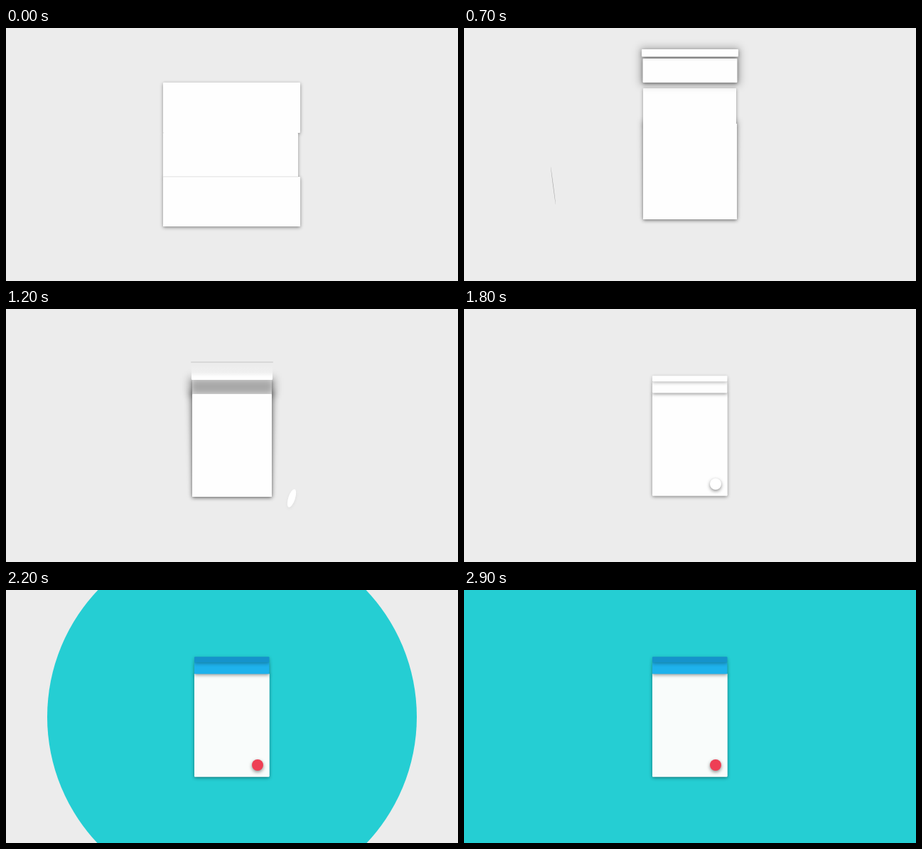
Write an HTML page with a canvas that moves like this. It is 636x357 px and loops after 3000 ms.

```html
<!DOCTYPE html>
<html lang="en">
<head>
<meta charset="utf-8">
<title>Paper folding</title>
<style>
  html, body { margin: 0; width: 100%; height: 100%; overflow: hidden; background: #ececec; }
  canvas { display: block; width: 636px; height: 357px; }
</style>
</head>
<body>
<canvas id="stage" width="636" height="357"></canvas>
<script>
const ctx = document.getElementById('stage').getContext('2d');
const LOOP = 3000, STEP = 100;
const PAPER = '#fefefe';

// Monotone cubic curve through (times, values)
function curve(times, values) {
  const slope = i => (values[i + 1] - values[i]) / (times[i + 1] - times[i]);
  const last = times.length - 1;
  const tangent = i => {
    if (i === 0) return slope(0);
    if (i === last) return 0;
    const a = slope(i - 1), b = slope(i);
    return a * b <= 0 ? 0 : 2 * a * b / (a + b);
  };
  return t => {
    if (t <= times[0]) return values[0];
    if (t >= times[last]) return values[last];
    let i = 0;
    while (t > times[i + 1]) i++;
    const d = times[i + 1] - times[i], u = (t - times[i]) / d, v = 1 - u;
    return values[i] * (1 + 2 * u) * v * v + tangent(i) * d * u * v * v
      + values[i + 1] * (3 - 2 * u) * u * u - tangent(i + 1) * d * u * u * v;
  };
}

const sheet = (...v) => curve([0, 400, 700, 1200, 1800], v);
const orbit = (...v) => curve([100, 400, 700, 950, 1200, 1800], v);

const tracks = {
  left: sheet(221, 233, 252, 262, 265),
  right: sheet(414, 403, 384, 374, 370.5),
  frontTop: sheet(210, 165, 135, 120, 118.5),
  bottom: sheet(280, 277, 270, 265, 263.5),
  backTop: sheet(148, 122, 85, 100, 118),
  backInset: sheet(3, 0, 1, 0, 0),
  barTop: sheet(77, 72.5, 43, 79, 102.5),
  barBottom: sheet(148, 122.5, 77, 100, 118.5),
  barPad: sheet(0, 0, 0.5, 1, 0),
  stripTop: sheet(77, 60.3, 30, 74.6, 94.3),
  stripHeight: sheet(0, 12.2, 10.5, 0.8, 8.2),
  stripPad: sheet(0, 0, 2, 2, 0),
  turn: sheet(0, 0, 0, 1, 0),
  softTop: sheet(77, 62, 28, 97, 100),
  softBottom: sheet(148, 122, 80, 122, 118),
  soft: sheet(0, 0.02, 0.28, 0.34, 0),
  lift: sheet(0, 0, 3, 5, 0),
  x: orbit(285, 187, 125.5, 255, 402, 354),
  y: orbit(165, 182.5, 222.5, 285, 267, 247),
  radius: orbit(24, 29.5, 27, 19, 13.3, 8),
  squash: orbit(0.95, 0.81, 0.012, 0.85, 0.36, 1),
  tilt: orbit(30, 25, -7.5, 5, 18, 0),
  cast: orbit(0, 0.23, 0, 0.03, 0, 0),
  contact: orbit(0, 0, 0, 0.1, 0.06, 0.45)
};

function shadow(alpha, blur = 5, dy = 1.5) {
  ctx.shadowColor = `rgba(0,0,0,${alpha})`;
  ctx.shadowBlur = blur;
  ctx.shadowOffsetY = dy;
}

function box(l, t, r, b, fill, alpha = 0) {
  if (b - t < 0.3) return;
  ctx.save();
  if (alpha) shadow(alpha);
  ctx.fillStyle = fill;
  ctx.beginPath();
  ctx.roundRect(l, t, r - l, b - t, 1);
  ctx.fill();
  ctx.restore();
}

function softShape(points, alpha, blur) {
  if (alpha < 0.005) return;
  ctx.save();
  ctx.filter = `blur(${blur}px)`;
  ctx.fillStyle = `rgba(0,0,0,${alpha})`;
  ctx.beginPath();
  points.forEach(p => ctx.lineTo(...p));
  ctx.fill();
  ctx.restore();
}

function drawDisc(p) {
  if (p.cast > 0.005) {
    ctx.save();
    ctx.translate(p.x - 16, p.y + 42);
    const glow = ctx.createRadialGradient(0, 0, 0, 0, 0, 78);
    glow.addColorStop(0, `rgba(0,0,0,${p.cast})`);
    glow.addColorStop(0.45, `rgba(0,0,0,${p.cast * 0.45})`);
    glow.addColorStop(1, 'rgba(0,0,0,0)');
    ctx.fillStyle = glow;
    ctx.fillRect(-78, -78, 156, 156);
    ctx.restore();
  }
  ctx.save();
  if (p.contact > 0.005) shadow(p.contact, 5, 2);
  ctx.fillStyle = p.squash < 0.05 ? '#a4a4a4' : p.fab;
  ctx.beginPath();
  ctx.ellipse(p.x, p.y, p.radius * p.squash, p.radius, p.tilt * Math.PI / 180, 0, 7);
  ctx.fill();
  ctx.restore();
}

function drawCard(p, t) {
  const { left: l, right: r } = p;
  const back = alpha => box(l, p.backTop, r - p.backInset, p.frontTop + 1, p.body, alpha);

  const k = Math.min(1, p.lift / 5);
  softShape([[l - p.lift, p.frontTop - 5], [r + p.lift, p.frontTop - 5],
    [r, p.bottom], [l, p.bottom]], 0.24 * k, 3.5);
  back(0.4);
  box(l, p.frontTop, r, p.bottom, p.body, 0.45);
  back(0);
  const spread = 4;
  softShape([[l - spread, p.softTop], [r + spread, p.softTop],
    [r + spread, p.softBottom], [l - spread, p.softBottom]], p.soft, 6);
  box(l, p.frontTop, r, p.bottom, p.body);

  // The bar greys towards its far edge while it turns over
  let fill = p.bar;
  if (p.turn > 0.02) {
    const grey = Math.round(254 - 18 * p.turn);
    fill = ctx.createLinearGradient(0, p.barTop, 0, p.barBottom);
    fill.addColorStop(0, `rgb(${grey},${grey},${grey})`);
    fill.addColorStop(0.5, `rgb(${grey + 4},${grey + 4},${grey + 4})`);
    fill.addColorStop(0.8, PAPER);
  }
  box(l - p.barPad, p.barTop, r + p.barPad, p.barBottom, fill, 0.42 * (1 - p.turn));

  const flush = Math.max(0, 1 - t / 300);
  if (flush) {
    ctx.globalAlpha = flush;
    box(l, p.backTop, r - p.backInset, p.frontTop, PAPER);
    box(l, p.frontTop - 0.5, r - p.backInset, p.frontTop + 0.3, '#d6d6d6');
    ctx.globalAlpha = 1;
  }

  const thin = p.stripHeight < 1.5;
  box(l - p.stripPad, p.stripTop, r + p.stripPad, p.stripTop + p.stripHeight,
    thin ? '#c6c6c6' : p.strip, thin ? 0 : 0.28);
}

function draw(t) {
  const p = {};
  for (const name in tracks) p[name] = tracks[name](t);
  const tinted = t >= 2100;
  Object.assign(p, tinted
    ? { body: '#f9fcfb', bar: '#1eb2ec', strip: '#1593cb', fab: '#ee3f55' }
    : { body: PAPER, bar: PAPER, strip: PAPER, fab: '#fff' });

  ctx.fillStyle = '#ececec';
  ctx.fillRect(0, 0, 636, 357);
  if (tinted) {
    ctx.fillStyle = '#25ced3';
    ctx.beginPath();
    ctx.arc(318, 179, 115 + (t - 2100) * 1.45, 0, 7);
    ctx.fill();
  }
  const behind = t < 400;
  if (behind && t > 0) drawDisc(p);
  drawCard(p, t);
  if (!behind) drawDisc(p);
}

let shown = -1;
function tick() {
  const t = Math.floor(performance.now() % LOOP / STEP) * STEP;
  if (t !== shown) draw(shown = t);
  requestAnimationFrame(tick);
}
tick();
</script>
</body>
</html>
```
